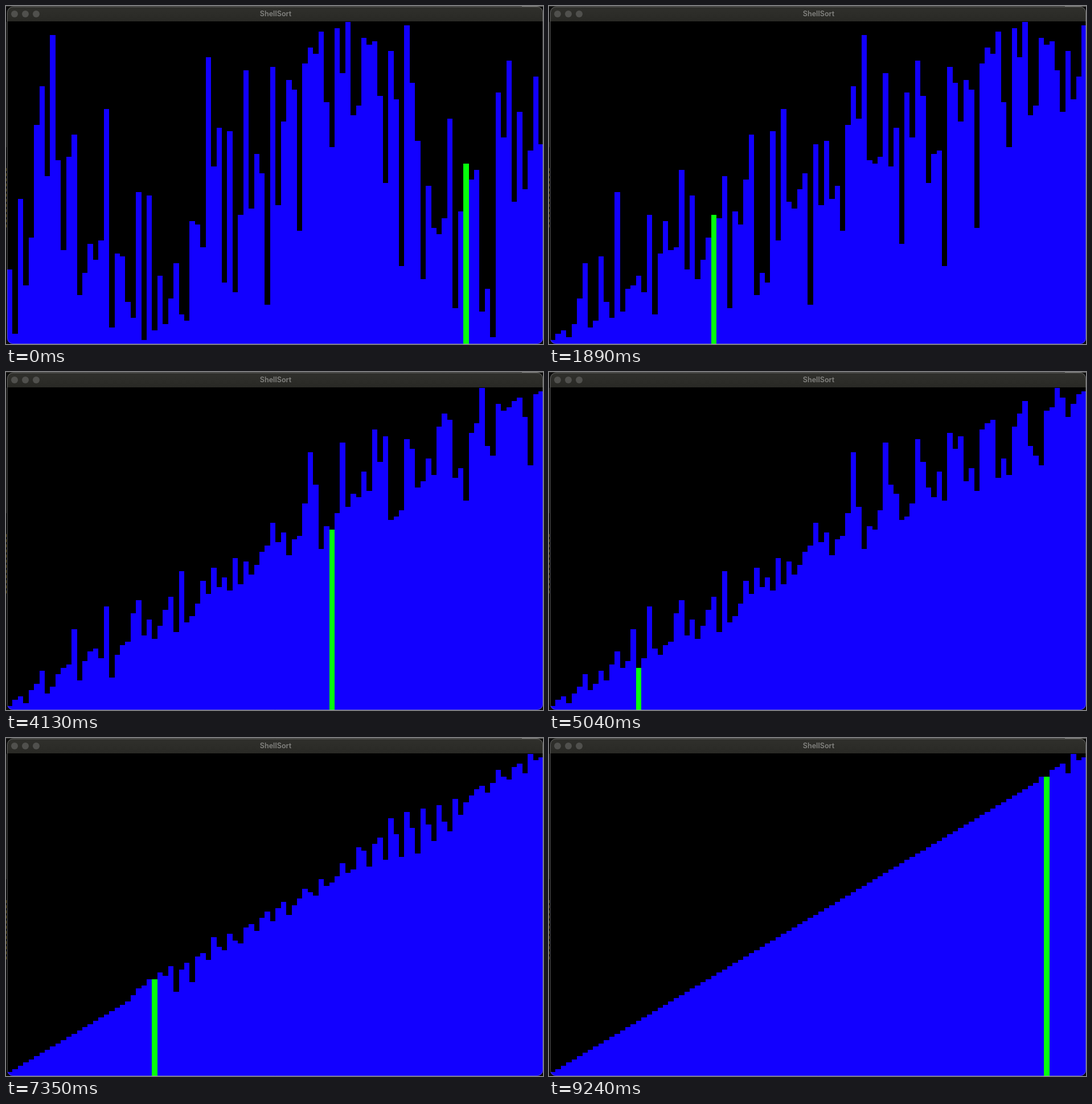
An HTML page with a canvas that plays this animation: 943x594 px, repeating every 9310 ms.

```html
<!DOCTYPE html>
<html lang="en">
<head>
<meta charset="utf-8">
<title>ShellSort</title>
<style>
  html, body { margin: 0; width: 100%; height: 100%; overflow: hidden; background: #000; }
  canvas { display: block; }
</style>
</head>
<body>
<canvas id="stage" width="943" height="594"></canvas>
<script>
const ctx = document.getElementById('stage').getContext('2d');
const W = 943, H = 594, LOOP = 9310, TICK = 70;
const LEFT = 2, PITCH = 9.425, BASE = 593, UNIT = 5.65;

// Bar heights (1 to 100) when the loop starts, late in the first pass.
const START = [
  23, 3, 45, 18, 33, 68, 80, 52, 96, 57, 29, 58, 65, 15, 22, 31, 26, 32, 73, 5,
  28, 27, 13, 8, 47, 1, 46, 4, 21, 6, 14, 25, 9, 7, 38, 37, 30, 89, 55, 67,
  19, 66, 16, 40, 85, 42, 59, 53, 12, 86, 43, 69, 82, 79, 35, 87, 92, 90, 97, 75,
  61, 98, 84, 100, 71, 74, 95, 93, 94, 77, 50, 91, 76, 24, 99, 81, 63, 20, 49, 36,
  34, 39, 70, 11, 41, 56, 51, 54, 10, 17, 2, 78, 64, 88, 44, 72, 48, 60, 83, 62
];

// Records the bars after every shift and every placement.
function shellSort(start, firstIndex) {
  const bars = start.slice(), steps = [];
  for (let gap = bars.length >> 1; gap > 0; gap >>= 1) {
    for (let i = steps.length ? gap : firstIndex; i < bars.length; i++) {
      const held = bars[i];
      const record = () => steps.push({ gap, i, j, bars: bars.slice() });
      let j = i;
      for (; j >= gap && bars[j - gap] > held; j -= gap) {
        bars[j] = bars[j - gap];
        record();
      }
      bars[j] = held;
      record();
    }
  }
  return steps;
}

const steps = shellSort(START, 85);

// Pacing: at each time (ms) the sort has reached this gap, i and j.
const pace = [
  [0, 50, 85, 85], [1050, 25, 77, 27], [2730, 12, 73, 73], [4130, 6, 60, 60],
  [6020, 3, 72, 69], [7350, 1, 28, 27], [9240, 1, 93, 92]
].map(([time, gap, i, j]) => ({
  time,
  step: steps.findIndex(s => s.gap === gap && s.i === i && s.j === j)
}));

function stepAt(time) {
  const k = Math.max(1, pace.findIndex(p => p.time >= time));
  const a = pace[k - 1], b = pace[k];
  const part = (time - a.time) / (b.time - a.time);
  return steps[Math.round(a.step + (b.step - a.step) * part)];
}

function rect(color, x, y, w, h) {
  ctx.fillStyle = color;
  ctx.fillRect(x, y, w, h);
}

function drawBars({ bars, j }) {
  const edge = i => Math.round(LEFT + PITCH * i);
  bars.forEach((value, i) => {
    const top = Math.round(BASE - value * UNIT);
    rect(i === j ? '#06ff0a' : '#1200ff', edge(i), top, edge(i + 1) - edge(i), H - top);
  });
}

function drawDesktop() {
  rect('#0c0c0c', 0, 0, W, H);
  rect('#343431', 0, 0, W, 1);
  rect('#777774', 906, 0, 37, 1);
  rect('#2b2b29', 0, 28, 1, 220);
  for (let y = 285; y < 390; y += 9) rect('#6b5a18', 0, y, 1, 5);
}

function drawTitleBar() {
  const shade = ctx.createLinearGradient(0, 1, 0, 27);
  shade.addColorStop(0, '#30302c');
  shade.addColorStop(1, '#292925');
  rect(shade, 0, 0, W, 27);
  ctx.fillStyle = '#50504d';
  for (const x of [15, 34, 53]) {
    ctx.beginPath();
    ctx.arc(x, 14, 6, 0, 2 * Math.PI);
    ctx.fill();
  }
  ctx.fillStyle = '#82827f';
  ctx.font = '600 12.6px Inter, sans-serif';
  ctx.textAlign = 'center';
  ctx.fillText('ShellSort', 473.5, 18);
}

function draw(time) {
  drawDesktop();
  ctx.save();
  ctx.beginPath();
  ctx.roundRect(2, 1, W - 2, H - 1, 10);
  ctx.clip();
  rect('#000', 0, 0, W, H);
  drawBars(stepAt(time));
  drawTitleBar();
  ctx.restore();
  ctx.strokeStyle = 'rgba(170, 170, 170, 0.45)';
  ctx.lineWidth = 1;
  ctx.beginPath();
  ctx.roundRect(2.5, 1.5, W - 3, H - 2, 10);
  ctx.stroke();
}

function frame() {
  const time = performance.now() % LOOP;
  draw(Math.floor(time / TICK) * TICK);
  requestAnimationFrame(frame);
}
frame();
</script>
</body>
</html>
```
